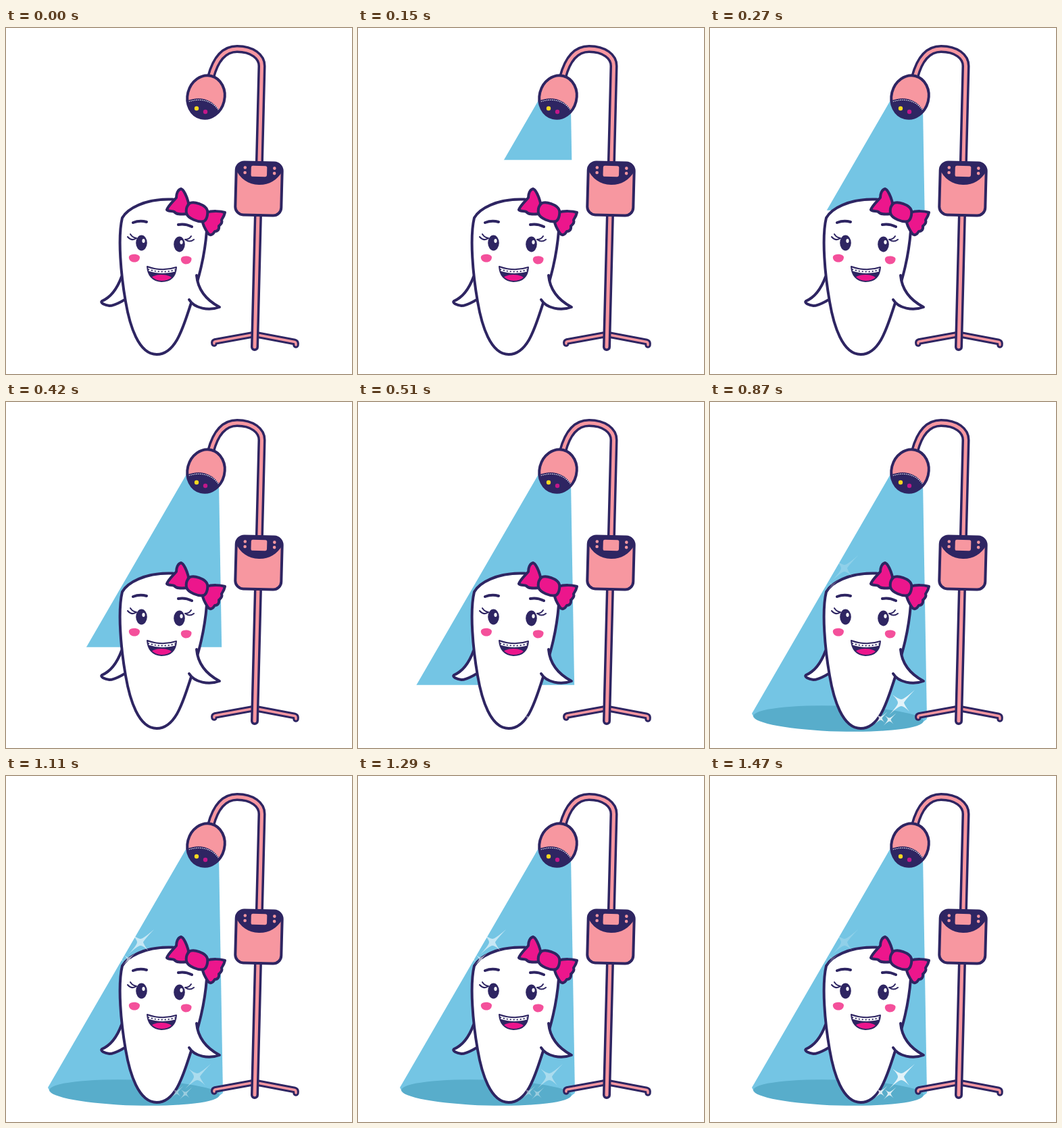
Write an HTML page that moves like this. It is 512 by 512 pixels and loops after 1.5 s.

```html
<!DOCTYPE html>
<html lang="en">
<head>
<meta charset="utf-8">
<title>Tooth under the lamp</title>
<style>
  html, body { margin: 0; width: 100%; height: 100%; overflow: hidden; background: #fff; }
  svg { display: block; width: 100vw; height: 100vh; }
  .line { fill: none; stroke: #2e2562; stroke-width: 4; stroke-linecap: round; stroke-linejoin: round; }
  .thin { stroke-width: 2; }
  .white { fill: #fff; }
  .navy { fill: #2e2562; }
  .pink { fill: #f797a0; }
  .hot { fill: #ec168c; }
  .cheek { fill: #f4509b; }
  .tube { fill: none; stroke-linecap: round; stroke-linejoin: round; }
</style>
</head>
<body>
<svg viewBox="0 0 512 512">
  <defs>
    <clipPath id="wipe"><rect id="shade" width="512" height="0"/></clipPath>
    <clipPath id="headClip"><ellipse cx="296" cy="102" rx="27.5" ry="32" transform="rotate(14 296 102)"/></clipPath>
    <clipPath id="boxClip"><rect x="340" y="199" width="68" height="78" rx="12"/></clipPath>
    <clipPath id="mouthClip"><path d="M209 353Q231 361 252 354C251 368 243 375 230 375C217 374 210 366 209 353Z"/></clipPath>
  </defs>

  <g clip-path="url(#wipe)">
    <path fill="#74c5e4" d="M267 107L62 461L65 467L316 473L321 469L315 118Z"/>
    <ellipse cx="190" cy="468.5" rx="126" ry="19" transform="rotate(1.7 190 468.5)" fill="#58adcb"/>
  </g>

  <g id="stand"></g>

  <g transform="rotate(1.5 374 238)">
    <rect class="pink" x="340" y="199" width="68" height="78" rx="12"/>
    <path class="navy" clip-path="url(#boxClip)" d="M338 196H410V208C402 224 390 232 374 232C358 232 346 224 338 208Z"/>
    <rect class="line" x="340" y="199" width="68" height="78" rx="12"/>
    <rect class="pink" x="362" y="204" width="23.5" height="16" rx="2.5"/>
    <g class="pink">
      <circle cx="353" cy="207" r="2.3"/><circle cx="353" cy="214.500" r="2.3"/>
      <circle cx="396.500" cy="207" r="2.3"/><circle cx="396.500" cy="214.500" r="2.3"/>
    </g>
  </g>

  <g>
    <g clip-path="url(#headClip)">
      <rect class="pink" x="260" y="65" width="70" height="75"/>
      <path class="navy" d="M264 110C282 99 307 103 318 126L300 140H264Z"/>
      <path d="M268 110C282 104 305 104 316 124" fill="none" stroke="#fff" stroke-width="1.100" stroke-dasharray="1.500 1.300"/>
    </g>
    <ellipse class="line" cx="296" cy="102" rx="27.5" ry="32" transform="rotate(14 296 102)"/>
    <circle cx="282" cy="119" r="3.2" fill="#fcd920"/>
    <circle cx="295" cy="124" r="3.2" fill="#c2188a"/>
  </g>

  <g class="line">
    <path class="white" d="M171 368C164 387 154 399 142 404C139 407 146 410 153 411C161 411 168 406 176 402"/>
    <path class="white" d="M172 281C179 268 205 252 246 253.5C285 258 300 275 297 300C294 340 285 370 274 407C264 436 253 483 223 483C196 483 183 440 177 405C170 365 165 310 172 281Z"/>
    <path class="white" d="M282 366C284 388 297 403 316 413C300 419 279 415 271 402"/>
    <path d="M188 288Q198 284 208 287M255 291Q265 289 275 294"/>
    <path class="thin" d="M180 309Q186 316 193 311M184 305Q187 310 193 311M278 313Q272 318 265 313M274 308Q271 313 265 313"/>
    <path class="hot" d="M270 259C268 250 263 239 259 238C254 239 252 246 252 251C246 258 240 263 238 269C241 272 246 270 249 272C252 276 258 276 268 275Z"/>
    <path class="hot" d="M297 273C305 270 318 271 324 273C323 278 321 281 319 284C321 289 317 291 315 293C316 299 312 301 309 301C306 306 302 308 299 304C295 298 291 291 291 286Z"/>
    <path class="hot" d="M271 260C277 255 296 262 298 270C299 276 297 284 293 286C285 288 269 282 267 274C266 268 268 263 271 260Z"/>
  </g>

  <g>
    <ellipse class="navy" cx="200.500" cy="318" rx="8.3" ry="11.400"/>
    <ellipse class="navy" cx="256.500" cy="320" rx="8.3" ry="11.400"/>
    <ellipse class="white" cx="203.500" cy="315" rx="2.1" ry="3"/>
    <ellipse class="white" cx="259.500" cy="317" rx="2.1" ry="3"/>
    <path class="cheek" d="M182 338C185 333 197 334 198 339C198 344 194 347 189 346.5C184 346 181 342 182 338Z"/>
    <path class="cheek" d="M259 341C261 336 273 337 274.500 341C275 346 271 349.500 266 349.500C261 349 258 345 259 341Z"/>
    <g clip-path="url(#mouthClip)">
      <rect class="navy" x="205" y="350" width="50" height="28"/>
      <ellipse class="hot" cx="230" cy="372" rx="16" ry="7"/>
      <path d="M208 355.500Q231 364 253 356.500" fill="none" stroke="#fff" stroke-width="6"/>
      <path d="M210 357Q231 364 252 357.500" fill="none" stroke="#2e2562" stroke-width="1.700" stroke-dasharray="2.200 2.800"/>
    </g>
    <path class="line thin" d="M209 353Q231 361 252 354C251 368 243 375 230 375C217 374 210 366 209 353Z" stroke-width="1.500"/>
  </g>

  <g id="low" class="white"></g>
  <g id="high" class="white" transform="translate(-84 -199)"></g>
</svg>

<script>
const $ = id => document.getElementById(id);
const LOOP = 1500, STEP = 30, PULSE = 300;

// Each tube is a wide dark stroke with a narrow pink one on top.
const tube = (d, outer, inner) =>
  `<path class="tube" d="${d}" stroke="#2e2562" stroke-width="${outer}"/>` +
  `<path class="tube" d="${d}" stroke="#f797a0" stroke-width="${inner}"/>`;

$('stand').innerHTML =
  tube('M367 453.500L309 464Q307.500 464.500 308 467', 9.5, 3.4) +
  tube('M369 453.500L427 464.500Q429.500 465 429 469', 9.5, 3.4) +
  tube('M303 73C309 50 320 31 342 31C364 31 379 42 378.500 57L368 472', 12, 5);

const star = (x, y, s) =>
  `<path transform="translate(${x} ${y}) scale(${s})" d="M20-19Q5-3 4 0Q5 4 12 13Q4 5 0 5Q-4 5-18 18Q-5 4-5 0Q-5-4-13-12Q-4-5 0-5Q4-5 20-19Z"/>`;

$('low').innerHTML = $('high').innerHTML =
  star(283, 445, 1) + star(252.5, 468, 0.5) + star(265.5, 470, 0.5);

// Triangle wave: 0 at the start, 1 half a pulse later.
const glow = (t, start) =>
  t < start ? 0 : 1 - Math.abs(((t - start) % PULSE) / (PULSE / 2) - 1);

function draw(now) {
  const t = Math.floor((now % LOOP) / STEP) * STEP;
  $('shade').setAttribute('height', Math.min(512, 102 + 0.621 * t));
  $('low').setAttribute('opacity', glow(t, 450));
  $('high').setAttribute('opacity', glow(t, 600));
}

let begin;
function tick(now) {
  begin ??= now;
  draw(now - begin);
  requestAnimationFrame(tick);
}
draw(0);
requestAnimationFrame(tick);
</script>
</body>
</html>
```
